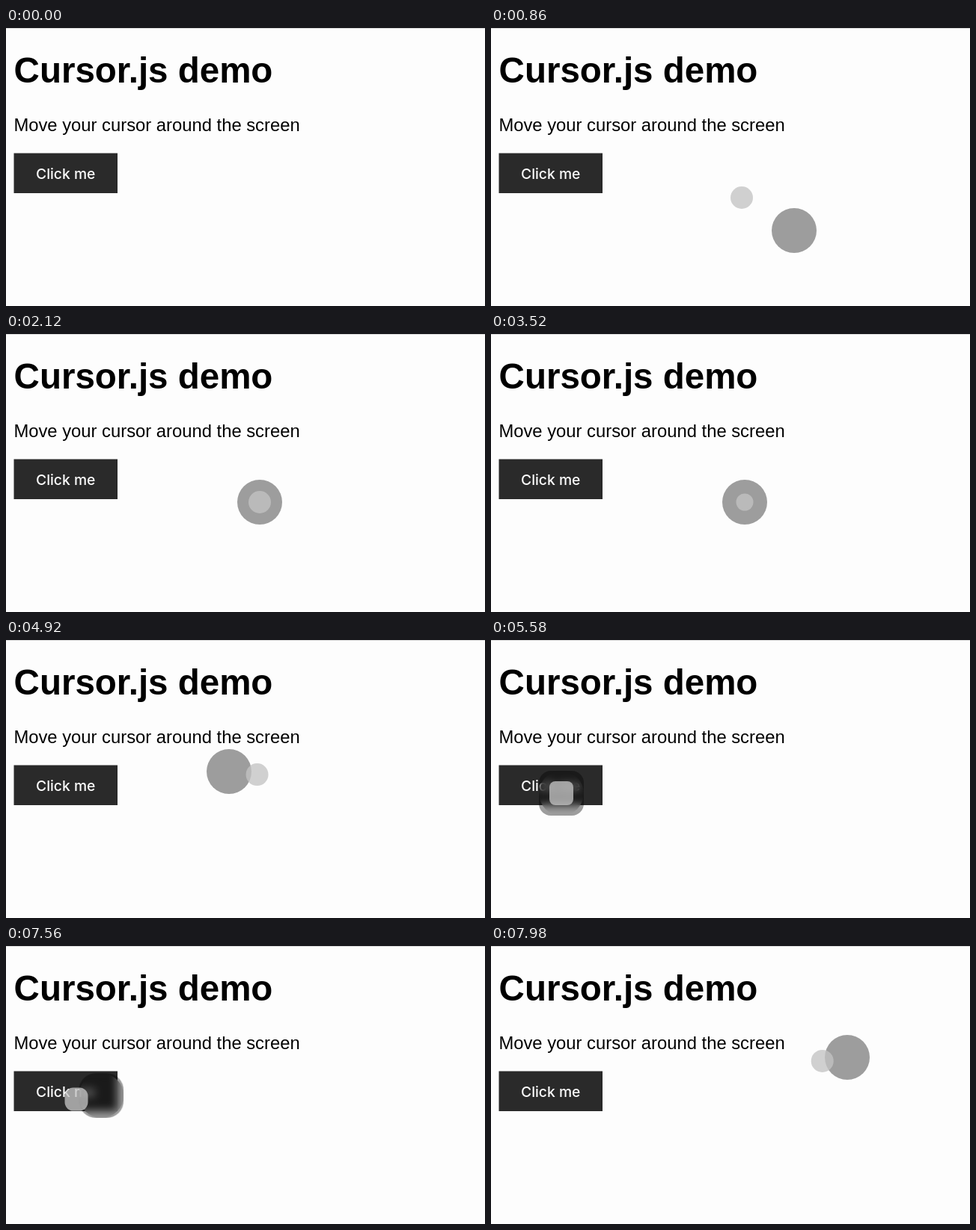
Write an HTML page that moves like this. It is 640x372 px and loops after 8 s.

```html
<!DOCTYPE html>
<html lang="en">
<head>
<meta charset="utf-8">
<title>Cursor.js demo</title>
<style>
  html, body { margin: 0; width: 100%; height: 100%; overflow: hidden; background: #fdfdfd; }
  svg { position: absolute; left: 0; top: 0; font-family: "Liberation Sans", Arial, sans-serif; }
  .dot { position: absolute; left: 0; top: 0; }
  #outer { background: rgba(0, 0, 0, .38); backdrop-filter: blur(6px); }
  #inner { background: rgba(195, 195, 195, .78); }
</style>
</head>
<body>
<svg width="640" height="372">
  <rect width="640" height="1" fill="#d8d8d8"/>
  <text x="10.6" y="73.4" font-size="47.5" font-weight="700">Cursor.js demo</text>
  <text x="10.4" y="138" font-size="23.8">Move your cursor around the screen</text>
  <rect x="10.5" y="167.5" width="138.5" height="53.5" fill="#2a2a2a"/>
  <text x="40" y="202" font-size="19.3" font-weight="500" font-family="Inter, sans-serif" fill="#fdfdfd">Click me</text>
</svg>
<div id="outer" class="dot"></div>
<div id="inner" class="dot"></div>
<script>
const LOOP = 8000, ENTER = 7, LAG = 2;
const outer = document.getElementById('outer');
const inner = document.getElementById('inner');

// Turning points of the pointer, each with its tick; equal neighbours are rests
const path = [
  { n: 7, x: 250, y: 380 },
  { n: 17, x: 335, y: 227 },
  { n: 19, x: 405, y: 271 },
  { n: 24, x: 522, y: 284 },
  { n: 30, x: 271, y: 247 },
  { n: 32, x: 271, y: 268 },
  { n: 41, x: 339, y: 225 },
  { n: 94, x: 339, y: 225 },
  { n: 99, x: 392, y: 205 },
  { n: 106, x: 298, y: 176 },
  { n: 114, x: 94, y: 205 },
  { n: 160, x: 94, y: 205 },
  { n: 171, x: 476, y: 149 }
];

// Three uneven ticks (20, 100, 20 ms) in every 140 ms
function tickAt(ms) {
  const p = ms % 140;
  return Math.floor(ms / 140) * 3 + (p < 20 ? 0 : p < 120 ? 1 : 2);
}

// Slope at a turning point; zero at the ends and where the pointer rests
function slope(i, axis) {
  const a = path[i - 1], k = path[i], b = path[i + 1];
  if (!a || !b) return 0;
  const same = q => q.x === k.x && q.y === k.y;
  return same(a) || same(b) ? 0 : (b[axis] - a[axis]) / (b.n - a.n);
}

// Smooth cubic through the turning points
function pointer(n) {
  n = Math.max(n, path[0].n);
  const i = path.findIndex((k, j) => j === path.length - 2 || n < path[j + 1].n);
  const a = path[i], b = path[i + 1], d = b.n - a.n, u = (n - a.n) / d, v = 1 - u;
  return ['x', 'y'].map(axis =>
    a[axis] * (1 + 2 * u) * v * v + b[axis] * u * u * (1 + 2 * v) +
    d * u * v * (slope(i, axis) * v - slope(i + 1, axis) * u));
}

function smooth(from, to, n) {
  const u = Math.min(Math.max((n - from) / (to - from), 0), 1);
  return u * u * (3 - 2 * u);
}

function place(el, [x, y], size, radius) {
  el.style.width = el.style.height = size + 'px';
  el.style.borderRadius = radius + 'px';
  el.style.transform = `translate(${x - size / 2}px, ${y - size / 2}px)`;
}

function draw() {
  const n = tickAt(performance.now() % LOOP);
  const hover = smooth(111, 116, n) - smooth(160, 164, n);
  const press = smooth(72, 76, n) - smooth(77, 81, n);
  const size = 30 + 2 * hover - 7 * press;
  outer.style.display = inner.style.display = n < ENTER ? 'none' : 'block';
  place(outer, pointer(n), 60, 30 - 14 * hover);
  place(inner, pointer(n - LAG), size, size / 2 - 8 * hover);
  requestAnimationFrame(draw);
}
draw();
</script>
</body>
</html>
```
